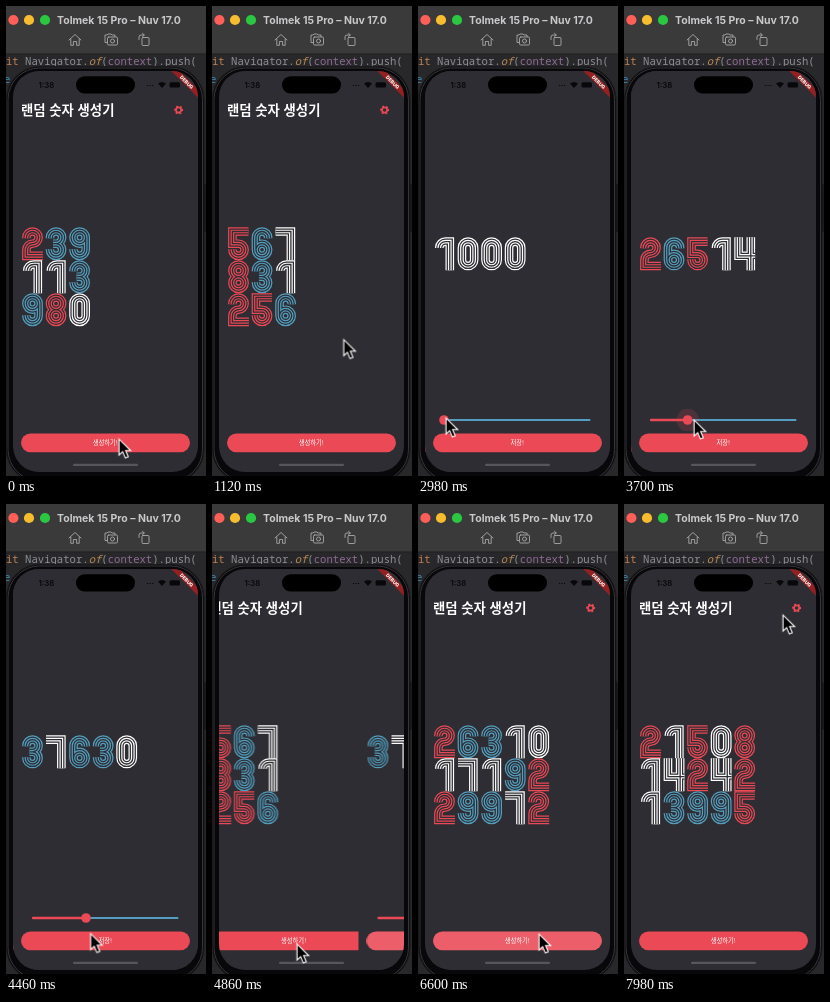
Animation of 200 by 470 pixels, one loop 8000 ms. Source, as an HTML page:

```html
<!DOCTYPE html>
<html lang="ko">
<head>
<meta charset="utf-8">
<title>랜덤 숫자 생성기</title>
<style>
  html, body { margin: 0; width: 100%; height: 100%; overflow: hidden; background: #28282a; }
  svg { display: block; width: 200px; height: 470px; }
  text { font-family: "Noto Sans CJK KR", "Noto Sans CJK", sans-serif; fill: #fff; }
  .ui { font-family: Inter, sans-serif; }
  .code { font: 10.6px "Noto Sans Mono", monospace; fill: #8d8f94; }
  .label { font-size: 6.3px; text-anchor: middle; }
  .line { fill: none; stroke: #a9a9ab; stroke-width: .9; stroke-linejoin: round; stroke-linecap: round; }

  #home { animation: home 8s infinite cubic-bezier(.35, .91, .33, .97); }
  #settings { animation: settings 8s infinite; }
  #cursor { animation: cursor 8s infinite; }
  .glow { fill: #fff; opacity: 0; }
  #home .glow { animation: tapHome 8s infinite linear; }
  #settings .glow { animation: tapSave 8s infinite linear; }
  #halo { opacity: 0; animation: halo 8s infinite linear; }

  @keyframes home {
    0%, 21.5% { transform: translateX(0); }
    27.75%, 58.9125% { transform: translateX(-61.7px); }
    65.1625%, 100% { transform: translateX(0); }
  }
  @keyframes settings {
    0%, 21.5% { transform: translateX(185px); animation-timing-function: cubic-bezier(.283, .044, .545, .57); }
    22.7375% { transform: translateX(84.9px); animation-timing-function: cubic-bezier(.209, 1, .4345, .976); }
    27.75%, 58.9125% { transform: translateX(0); animation-timing-function: cubic-bezier(.283, .044, .545, .57); }
    60.15% { transform: translateX(100.1px); animation-timing-function: cubic-bezier(.209, 1, .4345, .976); }
    65.1625%, 100% { transform: translateX(185px); }
  }
  @keyframes cursor {
    0%, 11.25% { transform: translate(113px, 433px); animation-timing-function: ease-in-out; }
    18.5%, 24.5% { transform: translate(175px, 104px); animation-timing-function: ease-in; }
    29.25% { transform: translate(95px, 272px); animation-timing-function: ease-out; }
    36.25%, 38.5% { transform: translate(28px, 412px); animation-timing-function: linear; }
    46.25% { transform: translate(70px, 414px); animation-timing-function: linear; }
    48.75%, 53.25% { transform: translate(84px, 414px); animation-timing-function: ease-in-out; }
    57.75%, 61% { transform: translate(85px, 440px); animation-timing-function: ease-in-out; }
    63.25%, 91% { transform: translate(121px, 430px); animation-timing-function: ease-in-out; }
    98.75%, 100% { transform: translate(159px, 111px); }
  }
  @keyframes tapHome {
    0%, .25% { opacity: 0; }
    1.5%, 11.25% { opacity: .12; }
    13.5%, 70.25% { opacity: 0; }
    71.5%, 89.25% { opacity: .12; }
    92.5%, 100% { opacity: 0; }
  }
  @keyframes tapSave {
    0%, 58% { opacity: 0; }
    59%, 66% { opacity: .12; }
    67%, 100% { opacity: 0; }
  }
  @keyframes halo {
    0%, 38.5% { opacity: 0; }
    39.5%, 51.2% { opacity: .18; }
    51.5%, 100% { opacity: 0; }
  }
</style>
</head>
<body>
<svg viewBox="0 0 200 470">
  <defs>
    <clipPath id="screen"><rect x="7" y="65" width="185" height="401" rx="26"/></clipPath>
  </defs>

  <!-- editor behind the simulator -->
  <rect width="200" height="470" fill="#28282a"/>
  <text class="code" y="59.3" xml:space="preserve"><tspan fill="#c07f52">it</tspan> Navigator.<tspan fill="#b98a55" font-style="italic">of</tspan>(<tspan fill="#8d6a94">context</tspan>).push(</text>
  <text class="code" x="-2" y="77" style="fill:#4189b3">e</text>

  <!-- window bar -->
  <rect width="200" height="48" fill="#3a3a3b"/>
  <rect y="47.5" width="200" height=".8" fill="#1d1c1e"/>
  <circle cx="7.4" cy="14" r="5.1" fill="#ff5f57"/>
  <circle cx="23" cy="14" r="5.1" fill="#f8bc2f"/>
  <circle cx="39" cy="14" r="5.1" fill="#2ac840"/>
  <text class="ui" x="51" y="17.5" font-size="10.5" font-weight="700" style="fill:#c9c9cb">Tolmek 15 Pro – Nuv 17.0</text>
  <g class="line">
    <path d="M63 34 69 28.5 75 34M64.8 33V39.3H67.4V35.5H70.6V39.3H73.2V33"/>
    <path d="M101 36.5H99V29H101L102 28H105L106 29H109V30.5"/>
    <rect x="101.5" y="31" width="10" height="8" rx="1.2"/>
    <circle cx="106.5" cy="35" r="2"/>
    <rect x="136" y="31.5" width="7" height="8" rx="1"/>
    <path d="M133 33.5V31Q133 29 135 29H138M136.5 27.3 138.3 29 136.5 30.7"/>
  </g>

  <!-- phone -->
  <rect x="197" y="178" width="2.6" height="48" rx="1" fill="#121214"/>
  <rect x=".5" y="60.5" width="197.5" height="416" rx="33" fill="#08080a" stroke="#1a1a1c"/>
  <rect x="2" y="62" width="194.5" height="413" rx="31.5" fill="none" stroke="#434346" stroke-width=".8"/>

  <g clip-path="url(#screen)">
    <rect x="7" y="65" width="185" height="401" fill="#2d2d33"/>
    <g id="home">
      <text x="15" y="108.5" font-size="13.35" font-weight="700">랜덤 숫자 생성기</text>
      <g fill="none" stroke="#ea4955" transform="translate(172.6 104) scale(.95)">
        <circle r="2.8" stroke-width="1.9"/>
        <circle r="4" stroke-width="1.5" stroke-dasharray="2.1 2.089" transform="rotate(-15)"/>
      </g>
      <g id="rolls"></g>
      <rect x="15" y="427.4" width="169" height="18.8" rx="9.4" fill="#ea4955"/>
      <rect class="glow" x="15" y="427.4" width="169" height="18.8" rx="9.4"/>
      <text class="label" x="99.3" y="439">생성하기!</text>
    </g>
    <g id="settings">
      <rect x="7" y="65" width="185" height="401" fill="#2d2d33"/>
      <g id="limit"></g>
      <rect x="26" y="413.1" width="146.5" height="1.9" rx=".9" fill="#549fbf"/>
      <rect id="filled" x="26" y="412.8" height="2.5" rx="1.2" fill="#ea4955"/>
      <g id="thumb" fill="#ea4955">
        <circle id="halo" r="11.3"/>
        <circle r="4.8"/>
      </g>
      <rect x="15" y="427.4" width="169" height="18.8" rx="9.4" fill="#ea4955"/>
      <rect class="glow" x="15" y="427.4" width="169" height="18.8" rx="9.4"/>
      <text class="label" x="99.3" y="439">저장!</text>
    </g>

    <!-- system overlay -->
    <text class="ui" x="32.5" y="81.8" font-size="7.8" font-weight="600" style="fill:#08080a">1:38</text>
    <path d="M141 79.5h1.2m1.3 0h1.2m1.3 0h1.2" stroke="#08080a"/>
    <path d="M152 77.6Q156 74.4 160 77.6L156 82Z" fill="#08080a"/>
    <rect x="163.5" y="76.2" width="10.5" height="5.4" rx="1.5" fill="#08080a"/>
    <rect x="70" y="70.3" width="59" height="17.2" rx="8.6" fill="#000"/>
    <rect x="67" y="457.8" width="65" height="2.3" rx="1.1" fill="#56565c"/>
    <g transform="translate(180.7 76.3) rotate(45)">
      <rect x="-22" y="-2.9" width="44" height="5.8" fill="#b71c1c" opacity=".75"/>
      <text class="ui" y="1.7" font-size="4.8" font-weight="800" text-anchor="middle">DEBUG</text>
    </g>
  </g>

  <g id="cursor">
    <path transform="scale(1.1)" d="M0 0V14.6L3.3 11.5 5.7 17.2 8.4 16.1 6 10.5H10.6Z" fill="#000" stroke="#fff"/>
  </g>
</svg>

<script>
  const RED = '#ea4955', BLUE = '#549fbf', WHITE = '#fff', BACK = '#2d2d33';
  const CELL = 23.55, ROW = 33, LOOP = 8000;

  // Centre lines of the ribbon digits; each is stroked as four parallel lines.
  const arc = (sweep, x, y) => `a6.1 6.1 0 0 ${sweep} ${x} ${y}`;
  const ring = y => `M5.4 ${y}${arc(1, 12.2, 0)}${arc(1, -12.2, 0)}Z`;
  const crown = `M5.4 11V10.4${arc(1, 12.2, 0)}${arc(1, -6.1, 6.1)}`;
  const belly = `${arc(1, 0, 12.2)}${arc(1, -6.1, -6.1)}V22`;
  const DIGITS = [
    [WHITE, `M5.4 10.4${arc(1, 12.2, 0)}V22.6${arc(1, -12.2, 0)}Z`],
    [WHITE, `M6.3 10.6V10.4${arc(1, 6.1, -6.1)}H16.8V33`],
    [RED, `${crown}${arc(0, -6.1, 6.1)}V28.7H21.9`],
    [BLUE, `${crown}H8.5M11.5 16.5${belly}`],
    [WHITE, 'M5.4 0V18.5H21.9M17.6 0V33'],
    [RED, `M21.4 4.3H5.4V16.5H11.5${belly}`],
    [BLUE, `M17.6 11V10.4${arc(0, -12.2, 0)}V22.6${arc(0, 12.2, 0)}${arc(0, -12.2, 0)}`],
    [WHITE, 'M1.5 4.3H16.8V33'],
    [RED, ring(10.4) + ring(22.6)],
    [BLUE, `M5.4 22V22.6${arc(0, 12.2, 0)}V10.4${arc(0, -12.2, 0)}${arc(0, 12.2, 0)}`],
  ];

  const drawDigit = (digit, x, y) => {
    const [color, path] = DIGITS[digit];
    const layers = [8.6, 6.2, 3.7, 1.3].map((width, i) =>
      `<path d="${path}" stroke-width="${width}" stroke="${i % 2 ? BACK : color}"/>`);
    return `<g fill="none" transform="translate(${x} ${y})">${layers.join('')}</g>`;
  };
  const drawRows = (rows, top) => rows.map((row, r) =>
    [...row].map((digit, i) => drawDigit(digit, 15 + i * CELL, top + r * ROW)).join('')).join('');

  const ROLLS = [
    [0, '239 113 980'], [40, '604 358 127'], [200, '871 492 335'], [380, '146 703 629'],
    [540, '958 264 410'], [700, '327 589 846'], [860, '567 831 256'],
    [5640, '30482 7915 21637'], [5800, '12759 34106 8523'], [5960, '25340 19867 31052'],
    [6120, '8914 27365 16203'], [6300, '33671 10428 24956'], [6460, '26310 17192 29972'],
    [6640, '14087 35629 20341'], [6780, '31926 22750 17468'], [6940, '19253 28041 36715'],
    [7100, '21508 14242 13995'],
  ];
  const DRAG = [[0, 0], [3080, 0], [3700, .257717], [3900, .37], [LOOP, .37]];

  const dragAt = t => {
    const i = DRAG.findIndex(([time]) => time > t);
    const [t0, v0] = DRAG[i - 1], [t1, v1] = DRAG[i];
    return v0 + (v1 - v0) * (t - t0) / (t1 - t0);
  };

  const byId = id => document.getElementById(id);
  const rolls = byId('rolls'), limit = byId('limit'), filled = byId('filled'), thumb = byId('thumb');
  const shown = new Map();
  const show = (node, text, top) => {
    if (shown.get(node) === text) return;
    shown.set(node, text);
    node.innerHTML = drawRows(text.split(' '), top);
  };

  const start = performance.now();
  function draw() {
    const t = Math.max(0, performance.now() - start) % LOOP;
    show(rolls, ROLLS.findLast(([time]) => time <= t)[1], 221.2);

    const tick = Math.min(LOOP - 1, Math.floor((t + 5) / 20) * 20);
    const share = dragAt(tick);
    show(limit, String(Math.round(1000 + share * 99000)), 231.3);
    filled.setAttribute('width', share * 146);
    thumb.setAttribute('transform', `translate(${26 + share * 146} 414)`);
    requestAnimationFrame(draw);
  }
  draw();
</script>
</body>
</html>
```
